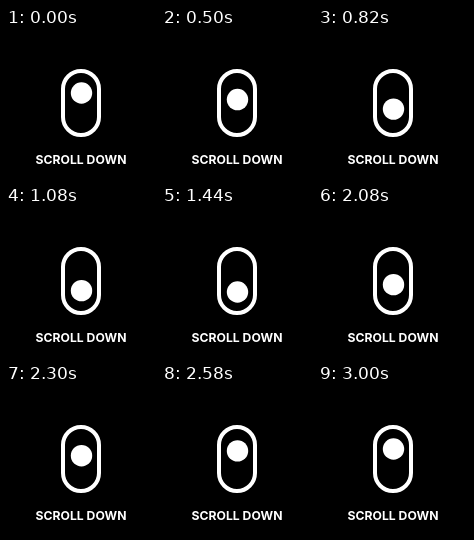
Animation of 150x150 px, one loop 3.12 s. Source, as an HTML page:

```html
<!DOCTYPE html>
<html lang="en">
<head>
<meta charset="utf-8">
<title>Scroll down</title>
<style>
  html, body { margin: 0; width: 100%; height: 100%; overflow: hidden; background: #000; }
  svg { display: block; width: 100vw; height: 100vh; }
  text { font: 700 12.2px Inter, "Open Sans", sans-serif; text-anchor: middle; }
</style>
</head>
<body>
<svg viewBox="0 0 150 150" fill="#fff">
  <rect x="57" y="43" width="36" height="64" rx="18" fill="none" stroke="#fff" stroke-width="4"/>
  <circle id="ball" cx="75.5" cy="65" r="10.7"/>
  <text x="75" y="136">SCROLL DOWN</text>
</svg>
<script>
  const LOOP = 3120, MOVE = 1200;
  const DOWN_AT = 360, UP_AT = 1920;
  const TOP = 65, TRAVEL = 21;
  const ball = document.getElementById('ball');
  const start = performance.now();

  // Cubic ease-out, clamped to its time span
  function progress(t, from) {
    const u = Math.min(1, Math.max(0, (t - from) / MOVE));
    return 1 - (1 - u) ** 3;
  }

  function draw() {
    const t = (performance.now() - start) % LOOP;
    const y = TOP + TRAVEL * (progress(t, DOWN_AT) - progress(t, UP_AT));
    ball.setAttribute('cy', y.toFixed(3));
    requestAnimationFrame(draw);
  }
  draw();
</script>
</body>
</html>
```
